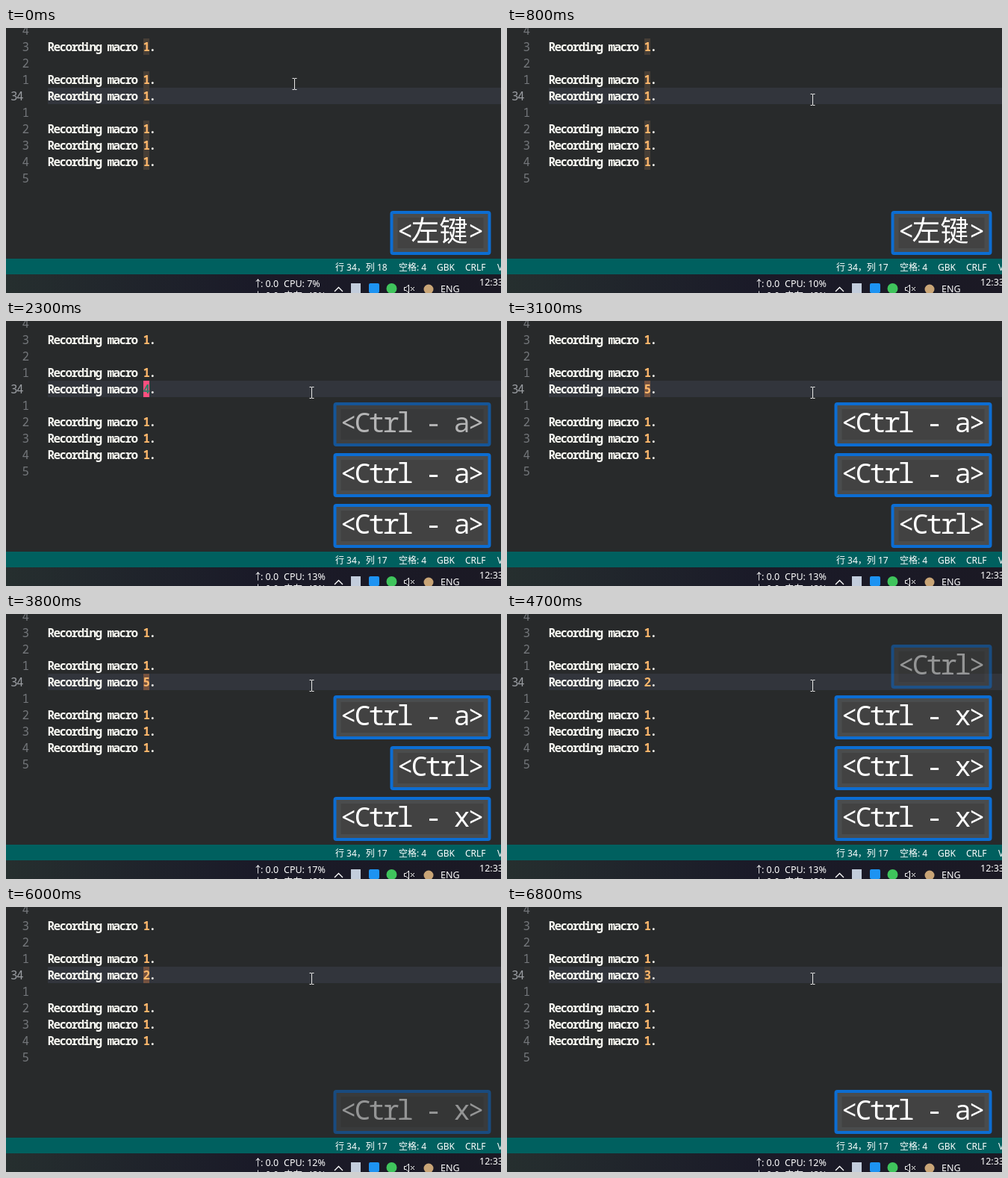
Animation of 663 by 355 pixels, one loop 6.9 s. Source, as an HTML page:

```html
<!DOCTYPE html>
<html lang="zh">
<head>
<meta charset="utf-8">
<style>
html, body { margin: 0; width: 100%; height: 100%; overflow: hidden; background: #282a2b; }
svg { display: block; }
text { white-space: pre; }
.code { font: 600 16px "Noto Sans Mono", monospace; letter-spacing: -1.6px; fill: #f8f8f2; }
.code .gutter { fill: #73767a; font-weight: 400; }
.code .num { fill: #ffb86c; }
.key text { font: 500 37px "Noto Sans Mono", monospace; letter-spacing: -3.2px; fill: #fff; }
.key .han { font: 38px "Noto Sans CJK SC", "Noto Sans CJK", sans-serif; letter-spacing: 0; }
.ui { font: 12px "Noto Sans", "Noto Sans CJK SC", "Noto Sans CJK", sans-serif; fill: #fff; }
.tray { font-size: 12.5px; }
.arrow { text-anchor: middle; }
</style>
</head>
<body>
<svg width="663" height="355" viewBox="0 0 663 355">
  <linearGradient id="bar">
    <stop stop-color="#262f2f"/><stop offset=".5" stop-color="#1a1a28"/><stop offset="1" stop-color="#1b1924"/>
  </linearGradient>
  <rect width="663" height="355" fill="#282a2b"/>
  <rect x="56" y="80" width="607" height="22" fill="#32353c"/>
  <g id="marks"></g>
  <rect id="block" x="184" y="80" width="8" height="22"/>
  <g id="lines" class="code"></g>
  <g id="keys"></g>
  <rect y="309" width="663" height="21" fill="#00605f"/>
  <g class="ui">
    <text id="pos" x="441" y="325"></text>
    <text x="526" y="325">空格: 4</text>
    <text x="577" y="325">GBK</text>
    <text x="615" y="325">CRLF</text>
    <text x="658" y="325">V</text>
  </g>
  <rect y="330" width="663" height="25" fill="url(#bar)"/>
  <g class="ui tray">
    <text class="arrow" x="337.500" y="347">↑</text>
    <text x="341" y="347">: 0.0</text>
    <text id="cpu" x="372" y="347"></text>
    <text class="arrow" x="337.500" y="363">↓</text>
    <text x="341" y="363">: 0.0</text>
    <text x="372" y="363">内存: 43%</text>
    <text x="582" y="354">ENG</text>
    <text x="634" y="345">12:33</text>
  </g>
  <path d="M440 353l5.500-5.500 5.500 5.500" fill="none" stroke="#fff" stroke-width="1.300"/>
  <rect x="462" y="342" width="13" height="13" fill="#c3cddc"/>
  <rect x="486" y="342" width="14" height="13" rx="2" fill="#1d93f2"/>
  <circle cx="516.500" cy="349" r="7" fill="#3fc45c"/>
  <path d="M533.500 347.500h2.500l3.500-3.500v11l-3.500-3.500h-2.500zM542 347l5 5m0-5l-5 5" fill="none" stroke="#fff"/>
  <circle cx="566" cy="350" r="6.500" fill="#c9a577"/>
  <path id="mouse" d="M-3 -7.500h2.500l.5 .5 .5-.5h2.500M0 -7v14M-3 7.500h2.500l.5-.5 .5 .5h2.500" fill="none" stroke="#e8e8e8"/>
</svg>
<script>
const LOOP = 6900, TICK = 100, FADE = 400;
const $ = id => document.getElementById(id);

const gutter = [4, 3, 2, 1, 34, 1, 2, 3, 4, 5];
const filled = [1, 3, 4, 6, 7, 8];
const CURRENT = 4;
const rowY = i => 3 + 22 * i;

$('lines').innerHTML = gutter.map((n, i) => {
  const y = rowY(i) + 6, here = i === CURRENT;
  const label = here
    ? `<text class="gutter" x="6" y="${y}" style="fill:#9b9ea3">${n}</text>`
    : `<text class="gutter" x="21.500" y="${y}">${n}</text>`;
  if (!filled.includes(i)) return label;
  const id = here ? ' id="value"' : '';
  return label + `<text x="55.500" y="${y}">Recording macro <tspan class="num"${id}>1</tspan>.</text>`;
}).join('');

$('marks').innerHTML = filled.filter(i => i !== CURRENT)
  .map(i => `<rect x="184" y="${rowY(i) - 11}" width="8" height="22" fill="#473e36"/>`).join('');

// label, shown from, gone at
const presses = [
  ['左键', 0, 2050], ['Ctrl', 900, 2250],
  ['Ctrl - a', 1100, 2560], ['Ctrl - a', 1700, 3000],
  ['Ctrl - a', 2100, 3600], ['Ctrl - a', 2400, 4200],
  ['Ctrl', 2900, 4900],
  ['Ctrl - x', 3800, 5200], ['Ctrl - x', 4200, 5600], ['Ctrl - x', 4600, 6200],
  ['Ctrl - a', 6400, 8000]
];
// time, value under the cursor
const edits = [[100, 1], [1200, 2], [1800, 3], [2200, 4], [2500, 5],
  [3900, 4], [4300, 3], [4700, 2], [6400, 3]];
const loads = [7, 10, 14, 13, 17, 13, 19, 12];

function keyCap(label, slot, alpha) {
  const han = label === '左键';
  const w = (han ? 6 : label.length + 2) * 19 + 21, x = 649.5 - w, y = 245 - 68 * slot;
  const text = han ? `<tspan class="han">${label}</tspan>` : label;
  return `<g class="key" opacity="${alpha}">
    <rect x="${x + 2}" y="${y + 2}" width="${w - 4}" height="55" rx="2" fill="#4a4c4d" stroke="#0c6dd2" stroke-width="4"/>
    <rect x="${x + 10}" y="${y + 9}" width="${w - 20}" height="41" fill="#424242"/>
    <text x="${x + 9}" y="${y + 40}">&lt;${text}&gt;</text></g>`;
}

function cursorColor(t, age) {
  if (t === 0) return '#473e36';
  if (age === 0) return 'none';
  if (age % 800 < 400) return '#ff4f7f';
  return t < 1200 || t >= 6400 ? '#473e36' : '#75523f';
}

function draw(t) {
  const [since, value] = edits.filter(e => e[0] <= t).pop() || [0, 1];
  const color = cursorColor(t, t - since);
  $('value').textContent = value;
  $('value').style.fill = color === '#ff4f7f' ? '#2f7d68' : '';
  $('block').setAttribute('fill', color);
  $('marks').style.display = value === 1 ? '' : 'none';

  $('keys').innerHTML = presses.filter(p => p[1] <= t && t < p[2]).reverse()
    .map(([label, , end], slot) => keyCap(label, slot, Math.min(1, (end - t) / FADE))).join('');

  const u = Math.min(1, Math.max(0, (t - 100) / 600)), k = u * u * (3 - 2 * u);
  $('mouse').setAttribute('transform', `translate(${386.5 + 23 * k} ${75 + 21 * k})`);
  $('pos').textContent = `行 34，列 ${t < 200 ? 18 : 17}`;
  $('cpu').textContent = `CPU: ${loads[Math.floor((t + 650) / 950)]}%`;
}

const start = performance.now();
let shown = -1;
function frame() {
  const t = Math.floor((performance.now() - start) % LOOP / TICK) * TICK;
  if (t !== shown) draw(shown = t);
  requestAnimationFrame(frame);
}
frame();
</script>
</body>
</html>
```
